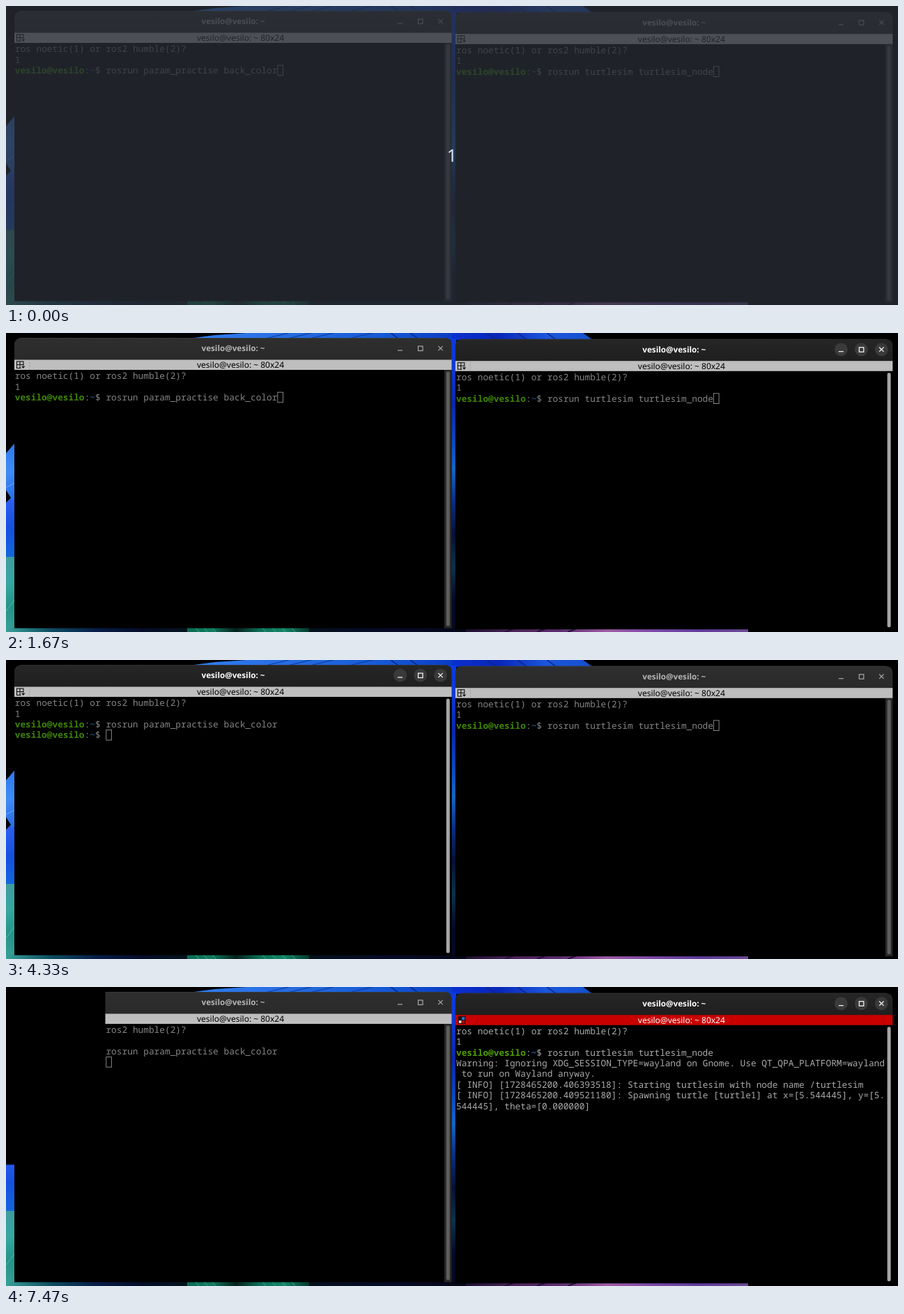
Recreate the animation shown at these times as an HTML page with a canvas. Size 1280 by 430 pixels, loop 8000 ms.

```html
<!DOCTYPE html>
<html lang="en">
<head>
<meta charset="utf-8">
<title>Two terminals</title>
<style>
html, body { margin: 0; width: 100%; height: 100%; overflow: hidden; background: #000; }
canvas { display: block; }
</style>
</head>
<body>
<canvas id="stage" width="1280" height="430"></canvas>
<script>
const ctx = document.getElementById('stage').getContext('2d');
const LOOP = 8000, TICK = 66.7;
const CELL = 7.69, ROW = 15.4;
const SANS = '"Noto Sans", "Open Sans", sans-serif';
const MONO = '"Noto Sans Mono", "DejaVu Sans Mono", monospace';
const USER = 'vesilo@vesilo';

const gray = v => `rgb(${v},${v},${v})`;
const mix = (a, b, p) => a + (b - a) * p;
const within = (t, a, b) => t >= a && t < b;

// Eased fade that advances in n discrete ticks from its start time.
function fade(t, start, n) {
  const k = Math.floor((t - start + 4) / TICK) + 1;
  const p = Math.min(Math.max(k / n, 0), 1);
  return 1 - (1 - p) ** 3;
}

function rect(x, y, w, h, fill) {
  ctx.fillStyle = fill;
  ctx.fillRect(x, y, w, h);
}

function round(x, y, w, h, radius, fill) {
  ctx.beginPath();
  ctx.roundRect(x, y, w, h, radius);
  ctx.fillStyle = fill;
  ctx.fill();
}

function poly(fill, ...points) {
  ctx.beginPath();
  for (let i = 0; i < points.length; i += 2) ctx.lineTo(points[i], points[i + 1]);
  ctx.closePath();
  ctx.fillStyle = fill;
  ctx.fill();
}

function line(color, width, x1, y1, x2, y2) {
  ctx.beginPath();
  ctx.moveTo(x1, y1);
  ctx.lineTo(x2, y2);
  ctx.strokeStyle = color;
  ctx.lineWidth = width;
  ctx.stroke();
}

function blend(x1, y1, x2, y2, ...stops) {
  const g = ctx.createLinearGradient(x1, y1, x2, y2);
  stops.forEach((c, i) => g.addColorStop(i / (stops.length - 1), c));
  return g;
}

function label(text, x, y, font, color) {
  ctx.font = font;
  ctx.textAlign = 'center';
  ctx.fillStyle = color;
  ctx.fillText(text, x, y);
}

function drawWallpaper() {
  rect(0, 0, 1280, 430, '#000');

  // top edge
  poly(blend(265, 0, 640, 0, '#2f7ff0', '#2b72e6', '#1f66dc', '#1458d4', '#0a3cc4'),
    262, 8, 300, 3, 345, 0, 645, 0, 645, 10, 262, 10);
  poly(blend(640, 0, 842, 0, '#0a2fd0', '#0826b8', '#1a56dc', '#1450cc'),
    640, 0, 828, 0, 842, 10, 640, 10);
  for (const x of [372, 404, 436, 492]) line('#0d3c9a', 1.2, x, 8, x + 34, 0);
  for (const x of [552, 580, 690, 734, 776]) line('#0a2480', 1.5, x, 0, x + 14, 10);

  // left edge
  poly(blend(0, 160, 0, 240, '#2f78ee', '#3f8cf6', '#2a6ce8'), 12, 159, 0, 173, 0, 245, 12, 245);
  line('#7db4ff', 0.8, 0, 222, 12, 216);
  rect(0, 240, 12, 84, blend(0, 240, 0, 324, '#2c5ef0', '#1450e0', '#1268dc'));
  poly('#000', 0, 226, 7, 237, 0, 244);
  rect(0, 322, 12, 108, blend(0, 322, 0, 430, '#3f9c9c', '#36a8a0', '#249488', '#38a096'));
  line('#5fc0b4', 0.8, 0, 400, 12, 384);

  // gap between the windows
  rect(638, 8, 8, 422, blend(0, 8, 0, 430,
    '#0a3ce0', '#0c38d8', '#0828b0', '#0a44c0', '#1468cc', '#083088', '#061038', '#0a3450', '#040a28', '#050820'));

  // bottom edge
  rect(0, 424, 260, 6, blend(0, 0, 260, 0, '#38a098', '#0c4c60', '#071c48', '#050c28', '#04141c'));
  rect(260, 424, 175, 6, blend(260, 0, 435, 0, '#0c6a54', '#0f7a5e', '#04201c', '#0c7058', '#128466', '#06382e'));
  for (const x of [272, 284, 296, 368, 382, 396, 410]) line('#3aa888', 1, x, 424, x + 5, 430);
  rect(435, 424, 225, 6, blend(435, 0, 660, 0, '#04101c', '#060a26', '#050716'));
  rect(660, 424, 405, 6, blend(660, 0, 1065, 0,
    '#1c1030', '#4a2258', '#5c2c70', '#a05aa4', '#7c48a8', '#5f3c9c', '#6c4a94'));
  for (const x of [716, 762, 806]) line('#241036', 2, x, 430, x + 16, 424);
}

function drawButtons(x, y, focus) {
  const ink = gray(mix(170, 255, focus));
  for (const dx of [553.5, 582.5, 611.5]) {
    ctx.beginPath();
    ctx.arc(x + dx, y + 15, 9.5, 0, Math.PI * 2);
    ctx.fillStyle = `rgba(58,58,58,${focus})`;
    ctx.fill();
  }
  const cy = y + 15;
  line(ink, 1.2, x + 550, cy + 3, x + 557, cy + 3);
  ctx.strokeRect(x + 579.5, cy - 3, 6.5, 6.5);
  line(ink, 1.2, x + 608.3, cy - 3.2, x + 614.7, cy + 3.2);
  line(ink, 1.2, x + 614.7, cy - 3.2, x + 608.3, cy + 3.2);
}

function drawTab(x, y, active) {
  rect(x, y, 627.5, 14.7, active ? '#c80000' : '#bebebe');
  const ix = x + 3.5, iy = y + 2;
  if (active) {
    rect(ix + 0.5, iy, 10.5, 10.5, '#151515');
    rect(ix + 6, iy + 1.2, 3.8, 3.8, '#2c7ad8');
    rect(ix + 1.6, iy + 6, 3.6, 3.6, '#e8e8e8');
    rect(ix + 6, iy + 6, 3.8, 3.6, '#c80000');
  } else {
    ctx.strokeStyle = '#111';
    ctx.lineWidth = 1.1;
    ctx.strokeRect(ix, iy + 0.5, 9.5, 9.5);
    line('#111', 1.1, ix + 4.5, iy + 0.5, ix + 4.5, iy + 10);
    line('#111', 1.1, ix, iy + 5, ix + 9.5, iy + 5);
    rect(ix + 6, iy + 6.5, 6, 5, '#bebebe');
    poly('#111', ix + 6.5, iy + 7.2, ix + 12, iy + 7.2, ix + 9.2, iy + 10.5);
    rect(x + 21, y + 1, 0.8, 13, '#a8a8a8');
  }
  label(`${USER}: ~ 80x24`, x + 324.5, y + 11.9, `12px ${SANS}`, active ? '#fff' : '#000');
}

function drawWindow(x, y, focus, active) {
  round(x, y, 627.5, 46, [9, 9, 0, 0],
    blend(0, y, 0, y + 32, gray(mix(46, 38, focus)), gray(mix(42, 31, focus))));
  line(gray(mix(62, 52, focus)), 0.8, x + 9, y + 0.5, x + 618, y + 0.5);
  label(`${USER}: ~`, x + 314, y + 19.3, `bold 11.7px ${SANS}`, gray(mix(180, 255, focus)));
  drawButtons(x, y, focus);
  drawTab(x, y + 31.5, active);
  rect(x, y + 46.2, 627.5, 371.3, '#000');
}

function drawScrollbar(x, y, focus) {
  rect(x + 617, y + 46.2, 10.5, 371.3, gray(mix(40, 0, focus)));
  round(x + 619.8, y + 48.5, 5, 366, 2.5, gray(mix(94, 166, focus)));
}

// Writes each word at its own column of the character grid.
function write(term, row, col, text, color, bold) {
  ctx.font = `${bold ? 'bold ' : ''}12.8px ${MONO}`;
  ctx.textAlign = 'left';
  ctx.fillStyle = color;
  for (const m of text.matchAll(/\S+/g)) {
    ctx.fillText(m[0], term.x + (col + m.index) * CELL, term.y + row * ROW + 12.1);
  }
}

function palette(active) {
  return active
    ? { text: '#aaaaaa', green: '#4e9f06', blue: '#3465a4' }
    : { text: '#858585', green: '#3e8405', blue: '#2a5183' };
}

function prompt(term, row, command, colors) {
  write(term, row, 0, USER, colors.green, true);
  write(term, row, 13, ':', colors.text);
  write(term, row, 14, '~', colors.blue, true);
  write(term, row, 15, '$ ' + command, colors.text);
}

function drawCursor(term, row, col, active, color) {
  const x = term.x + col * CELL, y = term.y + row * ROW;
  if (active) {
    rect(x, y, CELL, ROW, color);
  } else {
    ctx.strokeStyle = color;
    ctx.lineWidth = 1;
    ctx.strokeRect(x + 0.3, y + 0.4, CELL, ROW - 0.8);
  }
}

function intro(term, colors) {
  write(term, 0, 0, 'ros noetic(1) or ros2 humble(2)?', colors.text);
  write(term, 1, 0, '1', colors.text);
}

function drawLeft(t) {
  const focus = fade(t, 2730, 5) - fade(t, 5800, 4);
  const active = within(t, 2730, 4330);
  const colors = palette(active), term = { x: 12.7, y: 54 };
  drawWindow(12, 7, focus, active);
  drawScrollbar(12, 7, focus);
  intro(term, colors);
  prompt(term, 2, 'rosrun param_practise back_color', colors);
  if (t >= 3670) prompt(term, 3, '', colors);
  const hidden = within(t, 3330, 3470) || within(t, 4070, 4330);
  const [row, col] = t < 3530 ? [2, 49] : t < 3670 ? [3, 0] : [3, 17];
  if (!hidden) drawCursor(term, row, col, active, colors.text);
}

const OUTPUT = [
  'Warning: Ignoring XDG_SESSION_TYPE=wayland on Gnome. Use QT_QPA_PLATFORM=wayland',
  ' to run on Wayland anyway.',
  '[ INFO] [1728465200.406393518]: Starting turtlesim with node name /turtlesim',
  '[ INFO] [1728465200.409521180]: Spawning turtle [turtle1] at x=[5.544445], y=[5.',
  '544445], theta=[0.000000]'
];

function drawRight(t) {
  const focus = fade(t, 800, 3) - fade(t, 2200, 4) + fade(t, 6400, 3);
  const active = within(t, 800, 1670) || t >= 6400;
  const colors = palette(active), term = { x: 646, y: 55.7 };
  drawWindow(644.8, 8.7, focus, active);
  drawScrollbar(644.8, 8.7, within(t, 930, 1070) ? 0.9 : focus);
  intro(term, colors);
  prompt(term, 2, 'rosrun turtlesim turtlesim_node', colors);
  const shown = t < 7070 ? 0 : t < 7130 ? 2 : OUTPUT.length;
  OUTPUT.slice(0, shown).forEach((text, i) => write(term, 3 + i, 0, text, colors.text));
  const hidden = within(t, 1400, 1670) || t >= 7470;
  const [row, col] = t < 6930 ? [2, 48] : [3 + shown, 0];
  if (!hidden) drawCursor(term, row, col, active, colors.text);
}

// Blank new window growing in from the left.
function drawPopup(t) {
  const p = fade(t, 7270, 4);
  if (!p) return;
  rect(0, 0, mix(118, 142.5, p), mix(225, 255.5, p), `rgba(0,0,0,${p})`);
}

function drawCountdown() {
  rect(0, 0, 1280, 430, 'rgba(41,46,54,0.76)');
  ctx.save();
  ctx.beginPath();
  ctx.rect(0, 0, 643.5, 430);
  ctx.clip();
  label('1', 640, 224, `25px ${SANS}`, '#d4e4fb');
  ctx.restore();
}

function draw(t) {
  drawWallpaper();
  drawLeft(t);
  drawRight(t);
  drawPopup(t);
  if (t < 70) drawCountdown();
}

ctx.textRendering = 'geometricPrecision';
const start = performance.now();
function frame() {
  draw((performance.now() - start) % LOOP);
  requestAnimationFrame(frame);
}
frame();
</script>
</body>
</html>
```
